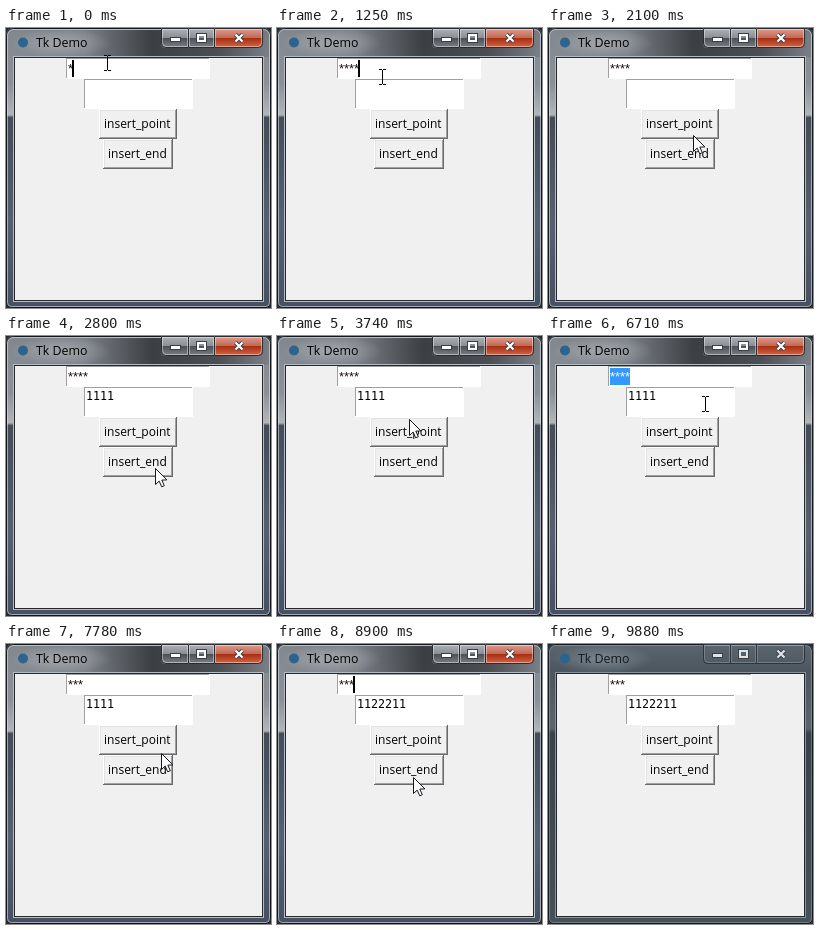
An HTML page with a canvas for the animation above (9.98 s loop, 265x280 px).

```html
<!DOCTYPE html>
<html lang="en">
<head>
<meta charset="utf-8">
<title>Tk Demo</title>
<style>
  html, body { margin: 0; width: 100%; height: 100%; overflow: hidden; background: #23272b; }
  canvas { display: block; width: 265px; height: 280px; }
</style>
</head>
<body>
<canvas id="stage"></canvas>
<script>
const W = 265, H = 280, LOOP = 9980;
const TICK = 137.2; // ms between screen refreshes; all times below count in ticks
const canvas = document.getElementById('stage');
const dpr = window.devicePixelRatio || 1;
canvas.width = W * dpr;
canvas.height = H * dpr;
const ctx = canvas.getContext('2d');
ctx.scale(dpr, dpr);

const UI = '12px "Open Sans", "Noto Sans", sans-serif';
const TITLE = '12.4px "Open Sans", "Noto Sans", sans-serif';
const MONO = '11.65px "DejaVu Sans Mono", monospace';
const STAR = '13px "Liberation Sans", sans-serif';

const ENTRY = { x: 60, y: 30, w: 144, h: 21 };
const TEXT = { x: 78, y: 51, w: 109, h: 30 };

// Key points of the pointer: tick, x, y
const PATH = [
  [3, 101, 35], [9, 105, 49], [15, 145, 107], [18, 149, 132],
  [25, 149, 132], [27, 132, 83], [33, 96, 62], [37, 96, 62],
  [38, 110, 61], [41, 110, 61], [46, 41, 33], [49, 157, 68],
  [56, 155, 109], [61, 147, 100], [65, 136, 133], [69, 170, 290]
];

const within = (k, a, b) => k >= a && k < b;
const clamp = (v, a, b) => Math.max(a, Math.min(b, v));
const hit = (r, p) => within(p.x, r.x, r.x + r.w) && within(p.y, r.y, r.y + r.h);
const blink = k => k % 6.5 >= 2;

function pointerAt(k) {
  const last = PATH.length - 1;
  const i = clamp(PATH.findLastIndex(p => p[0] <= k), 0, last - 1);
  const [k0, x0, y0] = PATH[i], [k1, x1, y1] = PATH[i + 1];
  const u = clamp((k - k0) / (k1 - k0), 0, 1);
  return { x: Math.round(x0 + (x1 - x0) * u), y: Math.round(y0 + (y1 - y0) * u) };
}

function stateAt(k) {
  const mouse = pointerAt(k);
  const retyped = k >= 51;
  const selecting = within(k, 43, 51);
  return {
    mouse, selecting,
    stars: retyped ? Math.floor((Math.min(k, 55) - 49) / 2) : 1 + Math.floor(Math.min(k, 9) / 3),
    selFrom: k < 46 ? clamp(Math.round((mouse.x - 62) / 5), 0, 4) : 0,
    beam: within(k, 43, 48) || hit(ENTRY, mouse) || hit(TEXT, mouse),
    entryCaret: k < 33 ? blink(k + 6) : within(k, 51, 69) && blink(k + 2.5),
    textCaret: within(k, 33, 37) || within(k, 41, 43),
    content: k >= 60 ? '1122211' : k >= 20 ? '1111' : '',
    pointPressed: within(k, 58, 60),
    endPressed: within(k, 18, 20),
    active: k < 72
  };
}

function rect(x, y, w, h, color) {
  ctx.fillStyle = color;
  ctx.fillRect(x, y, w, h);
}

function text(s, x, y, font, color) {
  ctx.font = font;
  ctx.fillStyle = color;
  ctx.fillText(s, x, y);
}

function gradient(x1, y1, stops) {
  const g = ctx.createLinearGradient(0, 0, x1, y1);
  stops.forEach(([at, color]) => g.addColorStop(at, color));
  return g;
}

function outline(x, y, w, h, radii, color) {
  ctx.beginPath();
  ctx.roundRect(x + 0.5, y + 0.5, w - 1, h - 1, radii);
  ctx.lineWidth = 1;
  ctx.strokeStyle = color;
  ctx.stroke();
}

function captionButton(x, w, radii, stops, active) {
  ctx.beginPath();
  ctx.roundRect(x, 0, w, 20, radii);
  if (active) {
    ctx.fillStyle = gradient(0, 20, stops);
    ctx.fill();
  }
  outline(x, 0, w + 1, 20, radii, active ? '#2a2e33' : '#2c353c');
  outline(x + 1, 1, w - 1, 18, radii, active ? 'rgba(255,255,255,.42)' : 'rgba(200,215,225,.28)');
}

function captionGlyphs(color) {
  const shade = '#3a3f43';
  rect(164, 9, 11, 5, shade);
  rect(165, 10, 9, 3, color);
  ctx.lineWidth = 1;
  ctx.strokeStyle = shade;
  ctx.strokeRect(190.5, 5.5, 10, 9);
  ctx.lineWidth = 2;
  ctx.strokeStyle = color;
  ctx.strokeRect(192, 7, 7, 6);
  for (const [stroke, width] of [[shade, 4], [color, 2.2]]) {
    ctx.beginPath();
    ctx.moveTo(229.5, 6.5); ctx.lineTo(236.5, 13.5);
    ctx.moveTo(236.5, 6.5); ctx.lineTo(229.5, 13.5);
    ctx.strokeStyle = stroke;
    ctx.lineWidth = width;
    ctx.stroke();
  }
}

function glow(color) {
  ctx.save();
  ctx.translate(55, 15);
  ctx.scale(1, 0.3);
  const g = ctx.createRadialGradient(0, 0, 8, 0, 0, 50);
  g.addColorStop(0, `rgba(${color},.5)`);
  g.addColorStop(1, `rgba(${color},0)`);
  ctx.fillStyle = g;
  ctx.fillRect(-51, -43, 102, 88);
  ctx.restore();
}

function frame(active) {
  rect(0, 0, W, H, '#23272b');
  ctx.beginPath();
  ctx.roundRect(0, 0, W, H, [7, 7, 5, 5]);
  ctx.fillStyle = gradient(0, H, active
    ? [[0, '#83888f'], [0.2, '#8b9097'], [0.31, '#b2b6ba'], [0.32, '#444c57'], [0.7, '#566070'], [1, '#465060']]
    : [[0, '#5a656e'], [0.1, '#4b565f'], [0.3, '#5a656e'], [0.32, '#38424a'], [1, '#465059']]);
  ctx.fill();
  if (active) {
    rect(2, 2, W - 4, 27, gradient(W, 0, [
      [0, 'rgba(35,38,42,0)'], [0.3, 'rgba(35,38,42,.1)'],
      [0.55, 'rgba(35,38,42,.75)'], [0.8, 'rgba(35,38,42,.6)'], [1, 'rgba(35,38,42,.1)']
    ]));
  }
  outline(0, 0, W, H, [7, 7, 5, 5], '#14181c');
  outline(1, 1, W - 2, H - 2, [6, 6, 4, 4], active ? 'rgba(215,226,238,.6)' : 'rgba(190,205,215,.35)');
  glow(active ? '190,194,198' : '150,163,173');

  ctx.beginPath();
  ctx.arc(17, 14.5, 5, 0, Math.PI * 2);
  ctx.fillStyle = '#2c648f';
  ctx.fill();
  text('Tk Demo', 30, 19, TITLE, active ? '#000' : '#14191d');

  const gray = [[0, '#b0b4b9'], [0.48, '#8b9096'], [0.5, '#4a4f55'], [1, '#7d838a']];
  const red = [[0, '#dfa092'], [0.48, '#c26a55'], [0.5, '#a62c12'], [1, '#d36a48']];
  captionButton(155, 27, [0, 0, 0, 4], gray, active);
  captionButton(182, 26, 0, gray, active);
  captionButton(208, 48, [0, 0, 4, 0], red, active);
  captionGlyphs(active ? '#fff' : '#dde3e7');

  rect(7, 28, 251, 246, active ? '#b3bdc8' : '#87929b');
  rect(8, 29, 249, 244, '#24282b');
  rect(9, 30, 247, 242, '#f0f0f0');
}

function bevel({ x, y, w, h }, outerTop, innerTop, innerBottom, outerBottom, fill) {
  rect(x, y, w, h, outerBottom);
  rect(x, y, w - 1, h - 1, outerTop);
  rect(x + 1, y + 1, w - 2, h - 2, innerBottom);
  rect(x + 1, y + 1, w - 3, h - 3, innerTop);
  rect(x + 2, y + 2, w - 4, h - 4, fill);
}

function button(label, x, y, w, pressed) {
  const shades = ['#fff', '#e3e3e3', '#a0a0a0', '#696969'];
  if (pressed) shades.reverse();
  bevel({ x, y, w, h: 30 }, ...shades, '#f0f0f0');
  const d = pressed ? 1 : 0;
  text(label, x + 5 + d, y + 19 + d, UI, '#000');
}

function field(r) {
  bevel(r, '#a0a0a0', '#fff', '#fff', '#fff', '#fff');
}

function arrow(x, y) {
  ctx.beginPath();
  [[0, 0], [0, 16], [3.7, 12.6], [6.2, 18.3], [8.8, 17.2], [6.3, 11.6], [11.4, 11.4]]
    .forEach(([dx, dy]) => ctx.lineTo(x + 0.5 + dx, y + 0.5 + dy));
  ctx.closePath();
  ctx.fillStyle = '#fff';
  ctx.fill();
  ctx.strokeStyle = '#15151f';
  ctx.lineWidth = 1;
  ctx.stroke();
}

function beam(x, y) {
  rect(x, y - 7, 1, 14, '#000');
  for (const dy of [-8, 7]) {
    rect(x - 3, y + dy, 3, 1, '#000');
    rect(x + 1, y + dy, 3, 1, '#000');
  }
}

function draw(k) {
  const s = stateAt(k);
  frame(s.active);

  field(ENTRY);
  if (s.selecting) rect(62 + s.selFrom * 5, 32, 20 - s.selFrom * 5, 17, '#3399ff');
  for (let i = 0; i < s.stars; i++) {
    text('*', 62 + i * 5, 44.5, STAR, s.selecting && i >= s.selFrom ? '#fff' : '#1c0c10');
  }
  if (s.entryCaret) rect(61 + s.stars * 5, 32, 2, 17, '#000');

  field(TEXT);
  [...s.content].forEach((c, i) => text(c, 80 + i * 7, 64, MONO, '#000'));
  if (s.textCaret) rect(93, 53, 2, 15, '#000');

  button('insert_point', 93, 81, 78, s.pointPressed);
  button('insert_end', 97, 111, 70, s.endPressed);

  if (s.active) (s.beam ? beam : arrow)(s.mouse.x, s.mouse.y);
}

let shown = -1;
const start = performance.now();
function loop() {
  const t = (performance.now() - start) % LOOP;
  const k = Math.floor((t + 25) / TICK);
  if (k !== shown) draw(shown = k);
  requestAnimationFrame(loop);
}
loop();
</script>
</body>
</html>
```
